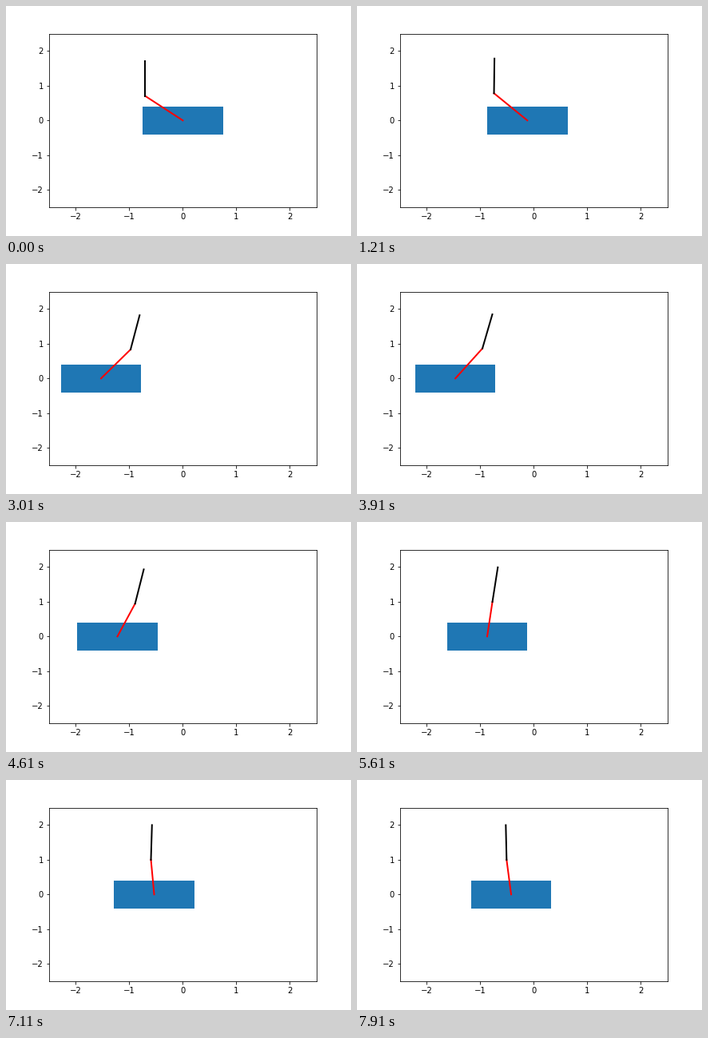
Recreate the animation shown at these times as a matplotlib script. Size 432 px wide and 288 px high, loop 8 s.

```python
import numpy as np
import matplotlib.pyplot as plt
from matplotlib.animation import FuncAnimation
from matplotlib.patches import Rectangle

FRAMES, INTERVAL = 80, 100
HOLD = 9                      # extra frames spent on the starting pose
CART_W, CART_H = 1.5, 0.8

# Key poses: step, cart position, tilt of lower rod, tilt of upper rod
STEPS, *POSES = np.array([
    (0, 0, np.pi / 4, 0),
    (9, -0.746, 0.1, -0.06),
    (21, -1.529, -0.585, -0.17),
    (37, -1.223, -0.337, -0.163),
    (47, -0.872, -0.098, -0.101),
    (54, -0.685, 0.003, -0.059),
    (70, -0.424, 0.085, 0.015),
]).T
POSES = np.transpose(POSES)


def spline_slopes(t, p):
    """Slopes of the smooth cubic spline: starts at rest, ends uncurved."""
    h = np.diff(t)
    d = np.diff(p, axis=0) / h[:, None]
    a, b = np.eye(len(t)), np.zeros_like(p)
    for i in range(1, len(h)):
        a[i, i - 1:i + 2] = h[i], 2 * (h[i - 1] + h[i]), h[i - 1]
        b[i] = 3 * (h[i] * d[i - 1] + h[i - 1] * d[i])
    a[-1, -2:] = 1, 2
    b[-1] = 3 * d[-1]
    return np.linalg.solve(a, b)


SLOPES = spline_slopes(STEPS, POSES)


def pose(step):
    i = min(np.searchsorted(STEPS, step, side="right"), len(STEPS) - 1) - 1
    h = STEPS[i + 1] - STEPS[i]
    u = (step - STEPS[i]) / h
    return ((1 + 2 * u) * (1 - u) ** 2 * POSES[i]
            + u * u * (3 - 2 * u) * POSES[i + 1]
            + h * u * (1 - u) * ((1 - u) * SLOPES[i] - u * SLOPES[i + 1]))


fig = plt.figure(figsize=(6, 4), dpi=72, facecolor="white")
fig.subplots_adjust(left=0.125, right=0.9, bottom=0.125, top=0.88)
ax = fig.add_subplot(xlim=(-2.5, 2.5), ylim=(-2.5, 2.5))
ax.set_xticks(range(-2, 3))
ax.set_yticks(range(-2, 3))

cart = ax.add_patch(Rectangle((0, -CART_H / 2), CART_W, CART_H,
                              color="tab:blue", linewidth=0))
lower, = ax.plot([], [], color="red", lw=2)
upper, = ax.plot([], [], color="black", lw=2)


def update(frame):
    x, a, b = pose(max(0, frame - HOLD))
    jx, jy = x - np.sin(a), np.cos(a)
    cart.set_x(x - CART_W / 2)
    lower.set_data([x, jx], [0, jy])
    upper.set_data([jx, jx - np.sin(b)], [jy, jy + np.cos(b)])
    return cart, lower, upper


anim = FuncAnimation(fig, update, frames=FRAMES, interval=INTERVAL,
                     init_func=lambda: update(0), repeat=True, repeat_delay=0)
plt.show()
```
